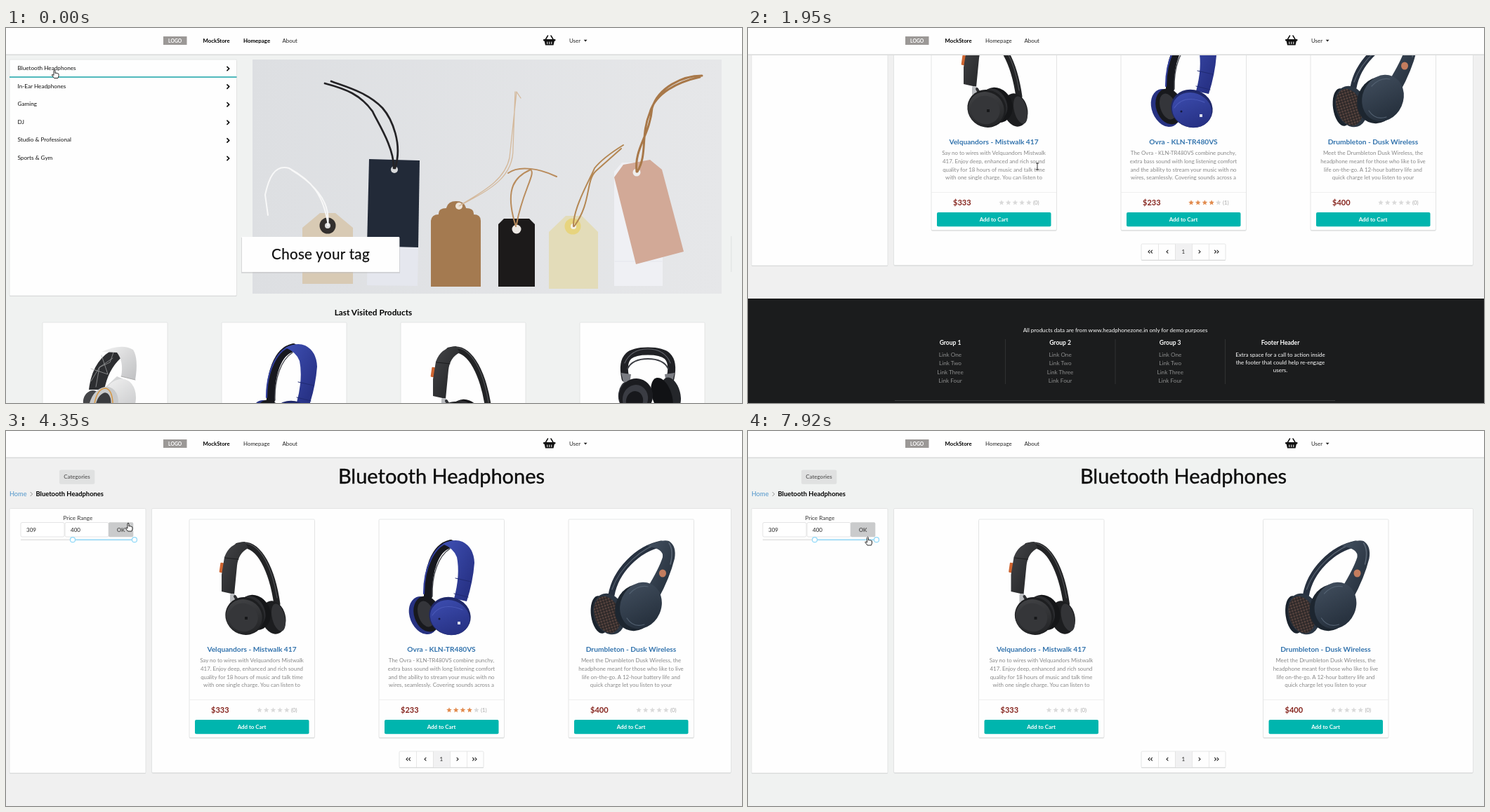
An HTML page that plays this animation: 1048x535 px, repeating every 8000 ms.

```html
<!DOCTYPE html>
<html lang="en">
<head>
<meta charset="utf-8">
<title>Shop price filter</title>
<style>
  html, body { margin: 0; width: 100%; height: 100%; overflow: hidden; background: #f0f2f1; }
  svg { display: block; width: 100vw; height: 100vh; font-family: Lato, sans-serif; }
</style>
</head>
<body>
<svg id="stage" viewBox="0 0 1048 535"></svg>
<script>
const MID = 'text-anchor="middle"', BOLD = 'font-weight="700"', MIDBOLD = MID + ' ' + BOLD;
const text = (x, y, size, str, attrs = '') => `<text x="${x}" y="${y}" font-size="${size}" ${attrs}>${str}</text>`;
const rect = (x, y, w, h, fill, attrs = '') => `<rect x="${x}" y="${y}" width="${w}" height="${h}" fill="${fill}" ${attrs}/>`;
const path = (d, fill, attrs = '') => `<path d="${d}" fill="${fill}" ${attrs}/>`;
const line = (d, color, width, attrs = '') => path(d, 'none', `stroke="${color}" stroke-width="${width}" stroke-linecap="round" ${attrs}`);
const oval = (x, y, rx, ry, fill, turn = 0, attrs = '') =>
  `<ellipse cx="${x}" cy="${y}" rx="${rx}" ry="${ry}" fill="${fill}" transform="rotate(${turn} ${x} ${y})" ${attrs}/>`;
const group = (body, attrs = '') => `<g ${attrs}>${body}</g>`;
const move = (body, x, y) => group(body, `transform="translate(${x} ${y})"`);
const chevron = (x, y, s, color, w, dir = 1) => line(`M${x - dir * s / 2} ${y - s}l${dir * s} ${s}l${-dir * s} ${s}`, color, w);
const panel = (x, y, w, h) => rect(x, y + 1, w, h, '#d4d6d6', 'rx="1.5"') +
  rect(x, y, w, h, '#fefefe', 'rx="1.5" stroke="#dfe0e0" stroke-width=".8"');
const blend = (id, a, b, dirs = 'x2="1" y2="1"') =>
  `<linearGradient id="${id}" x1="0" y1="0" ${dirs}><stop stop-color="${a}"/><stop offset="1" stop-color="${b}"/></linearGradient>`;

function star(x, y, color) {
  let d = '';
  for (let i = 0; i < 10; i++) {
    const a = i * Math.PI / 5, r = i % 2 ? 1.8 : 4;
    d += `${i ? 'L' : 'M'}${(x + r * Math.sin(a)).toFixed(2)} ${(y - r * Math.cos(a)).toFixed(2)}`;
  }
  return path(d + 'Z', color);
}

// Headphones, drawn where they stand in the list of three
const blackPair =
  line('M330 164C362 154 380 205 386 247', '#222325', 9) +
  line('M336 160C364 158 380 200 386 238', '#505154', 1.2) +
  rect(304.5, 188, 5, 14, '#cf6530', 'rx="1" transform="rotate(8 307 195)"') +
  path('M307 205L311 180Q318 160 340 158L345 167Q331 174 329 192L325 233L307 229Z', 'url(#coal)') +
  line('M312 181L331 183', '#1b1c1e', 1) +
  rect(319, 232, 7, 16, '#b9bbbe', 'rx="2"') + line('M326 236l6 10', '#303134', 4) +
  oval(381, 266, 17, 24, '#1c1d1f', -14) + oval(388, 266, 9, 20, '#333437', -14) +
  oval(354, 259, 22, 26, '#151618', -28) + oval(351, 257, 17, 23, '#2b2c2f', -28) +
  oval(340, 264, 28, 26.5, '#1d1e20', 30) + oval(339, 265, 26, 24.5, 'url(#coal)', 30) +
  oval(338, 266, 21, 20, '#353639', 30) + rect(340, 265, 4, 4, '#17181a');

const bluePair =
  line('M601 236C600 200 610 166 633 161', '#17181e', 12) +
  line('M595 232C595 195 610 160 635 158', '#323f9c', 2.2) +
  line('M607 236C606 205 616 178 632 168', '#44464d', 1.4) +
  path('M622 161Q638 153 650 158Q666 166 667 188Q665 215 656 243L638 239Q647 205 642 180Q638 168 622 161Z', 'url(#royal)') +
  line('M640 210l22 5M638 232l20 5', '#202a72', 1) +
  oval(595, 263, 20, 28, '#273282', -22) + oval(600, 261, 19, 26, '#18191d', -18) +
  oval(598, 261, 11, 19, '#34353a', -18) +
  oval(632, 264, 30, 27, '#1f2869', 20) + oval(632, 266, 28.5, 24.5, 'url(#royal)', 20) +
  line('M607 263Q620 243 650 255', '#4a59b8', 1.1) + rect(643, 272, 4, 4, '#d9dcea') +
  oval(617, 268, 1.5, 1.5, '#161a40');

const navyPair =
  line('M862 234C868 200 899 168 933 161', '#273140', 9) +
  line('M863 226C874 194 906 166 934 159', '#56616e', 1.3) +
  path('M913 164Q934 154 944 157Q955 164 952 182Q945 210 929 239L913 224Q930 196 935 180Q937 168 913 164Z', 'url(#slate)') +
  line('M944 160Q951 170 946 190', '#5c6876', 1.5) +
  oval(935, 203, 5, 5.5, '#c47d5e') +
  oval(846, 262, 13, 27, '#1b232d', -8) + oval(859, 261, 22, 30, '#2b3643', -18) +
  oval(856, 262, 18, 27, '#39302f', -18) + oval(856, 262, 18, 27, 'url(#mesh)', -18) +
  path('M915 240l16 7l-4 18l-8 3Z', '#1f2832') +
  oval(897, 252, 29, 34, '#1d2630', 24) + oval(904, 249, 29, 34, 'url(#slate)', 24) +
  line('M884 267Q893 281 909 276', '#526070', 1.2) + line('M888 232Q900 219 914 222', '#526070', 1.2);

const whitePair =
  path('M118 516Q123 472 156 457L168 467Q146 484 140 516Z', '#2d2e31') +
  line('M121 504l12-20l15-7l6-17M121 486l24 8l-9-27M128 512l5-28l19-13', '#a8a9ab', .7) +
  path('M136 462Q165 449 181 459Q189 472 184 502L164 497Q168 476 158 463Z', 'url(#pearl)') +
  line('M164 497l20 5', '#aaa', 1) + oval(123, 532, 13, 15, '#454649', 15) +
  path('M142 512l16-15l14 6l5 32h-40Z', '#d5d6d7') +
  oval(160, 533, 24, 33, 'url(#pearl)', 18) + oval(139, 538, 20, 27, '#c9cacb', 20) +
  line('M126 536Q130 514 142 514Q151 516 152 535', '#d79b4c', 1.7) +
  oval(138, 541, 11, 21, '#3a3b3e', 12);

const archPair =
  line('M882 500C875 467 890 461 914 461S953 467 946 500', '#202125', 11) +
  line('M881 478Q890 458 914 458T946 478', '#606269', 1.2) +
  line('M885 486Q892 472 914 472T943 486', '#3b3d43', 2) +
  path('M876 492l14 2l-2 13l-9-2ZM952 492l-14 2l2 13l9-2Z', '#7a7c82') +
  oval(881, 522, 9, 17, '#36383e', 8) + oval(947, 522, 13, 24, '#24262a', -15) +
  oval(934, 525, 14, 27, '#111215', -18) + oval(897, 525, 24, 25, '#1b1c20', 14) +
  oval(896, 529, 18, 20, '#3a3c43', 14) + oval(895, 532, 12, 14, '#17181c', 14);

const products = [
  { x: 350, name: 'Velquandors - Mistwalk 417', price: '$333', stars: 0, pair: blackPair, lines: [
    'Say no to wires with Velquandors Mistwalk', '417. Enjoy deep, enhanced and rich sound',
    'quality for 18 hours of music and talk time', 'with one single charge. You can listen to'] },
  { x: 620, name: 'Ovra - KLN-TR480VS', price: '$233', stars: 4, pair: bluePair, lines: [
    'The Ovra - KLN-TR480VS combine punchy,', 'extra bass sound with long listening comfort',
    'and the ability to stream your music with no', 'wires, seamlessly. Covering sounds across a'] },
  { x: 890, name: 'Drumbleton - Dusk Wireless', price: '$400', stars: 0, pair: navyPair, lines: [
    'Meet the Drumbleton Dusk Wireless, the', 'headphone meant for those who like to live',
    'life on-the-go. A 12-hour battery life and', 'quick charge let you listen to your'] }
];

function card({ x, name, price, stars, pair, lines }) {
  const left = x - 89;
  let s = panel(left, 126, 178.5, 311.5) + pair +
    text(x, 314.5, 10.2, name, `${MIDBOLD} fill="#3273ad"`) +
    lines.map((l, i) => text(x, 330 + i * 11.8, 7.9, l, `${MID} fill="#888"`)).join('') +
    rect(left, 383, 178, .8, '#ebebeb') +
    text(x - 58, 402, 11, price, `${BOLD} fill="#85231c"`);
  for (let i = 0; i < 5; i++) s += star(left + 100 + i * 9.7, 398.2, i < stars ? '#e18a4d' : '#dadada');
  return s + text(x + 56, 401, 7.8, stars ? '(1)' : '(0)', 'fill="#aaa"') +
    rect(x - 81, 412, 162.5, 20.3, '#00b5ae', 'rx="2"') +
    text(x, 425, 7.9, 'Add to Cart', `${MIDBOLD} fill="#fff"`);
}

function header() {
  const name = (id, attrs) => text(338, 20.7, 7.9, 'Homepage', `id="${id}" ${attrs}`);
  return rect(0, 37, 1048, 2, '#dcdddd') + rect(0, 0, 1048, 37.3, '#fefefe') +
    rect(224, 12, 33.5, 12, '#9b9896') + text(240.7, 20.5, 6.8, 'LOGO', `${MIDBOLD} fill="#fff"`) +
    text(280.5, 20.7, 7.8, 'MockStore', BOLD) + name('navBold', BOLD) + name('navPlain', 'fill="#222"') +
    text(393.5, 20.7, 7.9, 'About', 'fill="#222"') +
    rect(765, 16, 17.5, 2.4, '#111', 'rx="1"') + path('M766.5 18h14.5l-1.5 6.5h-11.5Z', '#111') +
    line('M768.5 16l3-5M779 16l-3-5', '#111', 1.5) +
    line('M770.8 20v2.6M773.8 20v2.6M776.8 20v2.6', '#fff', 1) +
    text(802, 20.7, 7.9, 'User', 'fill="#222"') + path('M822.7 16.8h4.8l-2.4 2.6Z', '#222');
}

function hero() {
  const twine = (d, color, w = 2) => line(d, color, w, 'stroke-linejoin="round"');
  return rect(351, 45, 668, 334, 'url(#wall)') +
    path('M422 285L447 264H469L494 285V365H422Z', '#d8cab4') + oval(458, 282, 11.5, 11.5, '#332f2d') + oval(458, 282, 4, 4, '#ddd') +
    twine('M459 282C452 238 436 218 403 200C382 194 374 215 369 238L373 267M458 282C464 243 430 217 407 203', '#f8f8f8', 2) +
    path('M517 187L589 189L586 368L514 367Z', '#e5e7ee') + path('M517 187L589 189L587 313L514 311Z', '#222a38') +
    oval(553, 202, 5, 5, '#d8d9db') +
    twine('M552 200C553 170 528 133 522 119C505 95 484 87 454 79M554 200C565 166 550 130 536 114C514 91 481 83 463 76', '#242326', 2.7) +
    path('M605 369V275Q606 266 616 266Q615 257 627 257Q629 247 641 247Q653 247 655 257Q667 257 666 266Q676 266 676 275V369Z', '#a47a50') +
    oval(645, 254, 5, 5, '#eee5da') +
    twine('M645 254C671 237 710 220 717 185L727 91M645 254C688 231 723 214 722 171L725 91M727 91l6 9', '#d4b99c', 1.3) +
    path('M701 280L709 272H745L753 280V369H701Z', '#1c1a1a') + oval(727, 287, 6.5, 6.5, '#ece8e4') +
    twine('M726 283C708 226 727 211 747 202C755 207 735 234 727 280M715 207C731 195 761 201 784 212', '#b98c5d', 2) +
    path('M773 291L797 268H820L843 291V372H773Z', '#e3dcb9') + oval(807, 283, 11.5, 11.5, '#e7d47e') + oval(808, 283, 4, 4, '#f4f1e6') +
    twine('M808 283C807 257 833 213 838 200Q850 185 879 167M809 283C834 249 825 218 840 204L876 172', '#b48753', 2) +
    path('M866 205L877 192H922L935 205V368H866Z', '#eff0f4') + line('M867 333H934', '#dcdee4', .6) +
    path('M866 213L879 195L917 188L934 202L965 319L897 337Z', '#d2a997') + oval(898, 206, 5.5, 5.5, '#eee') +
    twine('M898 205C894 172 917 153 920 114C929 85 963 68 991 68M899 205C914 179 903 154 917 120C925 93 956 77 988 70', '#a87849', 3) +
    rect(335, 299, 226, 51, '#bfc0c2', 'opacity=".5"') + rect(336, 298, 224, 50, '#fefefe') +
    text(448, 330, 20.6, 'Chose your tag', `${MID} letter-spacing=".3" fill="#111" stroke="#111" stroke-width=".25"`);
}

function home() {
  const names = ['Bluetooth Headphones', 'In-Ear Headphones', 'Gaming', 'DJ', 'Studio &amp; Professional', 'Sports &amp; Gym'];
  const thumbs = [[52, whitePair], [307, move(bluePair, -224, 295)], [562, move(blackPair, 301, 296)], [817, archPair]];
  return panel(5, 45, 323.5, 337) + rect(5, 69.2, 323.5, 1.6, '#27a9ac') +
    names.map((n, i) => text(16.5, 60 + i * 25.6, 8.2, n, 'fill="#111"') + chevron(316.3, 58 + i * 25.6, 2.7, '#111', 1.7)).join('') +
    hero() + rect(1032, 297, 1.3, 51, '#e2e5e4') +
    text(523, 409.7, 11.8, 'Last Visited Products', MIDBOLD) +
    thumbs.map(([x, pair]) => panel(x, 420, 178, 140) + pair).join('');
}

function footer() {
  const links = ['Link One', 'Link Two', 'Link Three', 'Link Four'];
  let s = rect(0, 535, 1048, 200, '#1b1c1d') +
    text(523, 582.5, 8, 'All products data are from www.headphonezone.in only for demo purposes', `${MID} fill="#fff"`);
  for (let i = 0; i < 3; i++) {
    const x = 288 + i * 156.6;
    s += text(x, 600.5, 8.5, 'Group ' + (i + 1), `${MIDBOLD} fill="#fff"`) +
      links.map((l, j) => text(x, 618 + j * 12.3, 8.2, l, `${MID} fill="#8d8e8e"`)).join('') +
      rect(x + 78, 593, .8, 64, '#363738');
  }
  const call = ['Extra space for a call to action inside', 'the footer that could help re-engage', 'users.'];
  return s + text(758, 600.5, 8.5, 'Footer Header', `${MIDBOLD} fill="#fff"`) +
    call.map((l, j) => text(758, 618.3 + j * 10.8, 8, l, `${MID} fill="#fff"`)).join('') +
    rect(209, 680, 627, .9, '#404142');
}

function listing() {
  const pager = panel(560, 457, 120, 23) + rect(608, 457.4, 24, 22.3, '#f1f1f2') +
    [584, 608, 632, 656].map(x => rect(x, 457, .7, 23, '#dedede')).join('') +
    text(619.8, 471.2, 8, '1', `${MID} fill="#222"`) +
    [[571, -1], [574.5, -1], [597, -1], [643, 1], [665.5, 1], [669, 1]].map(([x, d]) => chevron(x, 468.2, 2, '#222', 1.1, d)).join('');
  const field = (x, id, value) => rect(x, 130.5, 62, 20.5, '#fff', 'rx="2" stroke="#dededf" stroke-width=".8"') +
    text(x + 8, 144, 8, value, `id="${id}" fill="#222"`);
  const knob = id => `<circle id="${id}" cx="183" cy="155.2" r="3.5" fill="#fff" stroke="#8fd8f8" stroke-width="1.2"/>`;
  return rect(76, 55.5, 50.3, 20.2, '#e0e1e1', 'rx="2"') + text(101, 68.3, 7.9, 'Categories', `${MIDBOLD} fill="#686868"`) +
    text(5, 93, 9.2, 'Home', 'fill="#4e94ca"') + chevron(36.3, 90, 2.7, '#888', .9) +
    text(42.5, 93, 9.4, 'Bluetooth Headphones', BOLD) +
    text(620, 75, 29, 'Bluetooth Headphones', `${MID} fill="#0d0d0d" stroke="#0d0d0d" stroke-width=".35"`) +
    panel(5, 110.5, 194, 377.5) + panel(207.5, 110.5, 825, 377) +
    text(102.3, 127, 8.1, 'Price Range', `${MID} fill="#333"`) +
    field(21, 'low', '233') + field(84, 'high', '400') +
    rect(146, 130.2, 35.3, 21, '#e0e1e1', 'id="ok" rx="2"') + text(163.6, 143.7, 7.9, 'OK', `${MIDBOLD} fill="#555"`) +
    rect(21, 154.2, 162, 2, '#e7e7e7') + rect(21, 154.2, 162, 2, '#a9e0f9', 'id="track"') + knob('knob') + knob('knobEnd') +
    products.map((p, i) => group(card(p), `id="card${i}"`)).join('') + pager + footer();
}

// Pointer shapes with their hot spot at 0,0
const fist = 'M-4 -1Q-4 -4 -2.5 -3.5Q-2 -5.5 -.5 -4.5Q1 -5.7 2 -4Q4 -4.5 4 -2V1Q3 3 2.5 5H-2Q-3 3 -5 1Q-6 -1 -4 -1Z';
const inked = 'stroke="#111" stroke-width=".9" stroke-linejoin="round"';
const shapes = {
  arrow: path('M0 0V9.4L2.2 7.4L3.7 10.8L5.2 10.1L3.7 6.8H6.6Z', '#fff', inked),
  hand: path('M-1 1Q0 -.8 1 1V5Q2 4 3 5Q4 4.3 4.8 5.6Q6 5 6 7V9L5 12H-.5L-3.8 7.6Q-3.6 6 -1 8Z', '#fff', inked),
  beam: line('M-1.6 -4.5H1.6M0 -4.5V4.5M-1.6 4.5H1.6', '#222', .9),
  grab: path('M-2.8 0L-3.6 -3Q-2.8 -4.5 -2 -2.8L-1.5 -4.7Q-.4 -5.7 .2 -4.6L1 -5Q2 -5 2.1 -3.6Q4.2 -4.6 4.1 -2V1L2.5 5H-2L-5 .8Q-4.7 -1.3 -2.8 0Z', '#fff', inked) +
    line('M-1.4 -2.5v1.8M.3 -3v2.2M2 -2.8v2', '#111', .6),
  fist: path(fist, '#fff', inked) + line('M-1.7 -3v1.6M.2 -3.4v1.8M2 -3v1.5', '#111', .6)
};

// time, x, y, shape from then on
const route = [
  [0, 69, 59.5, 'hand'], [230, 69, 59.5, 'arrow'], [700, 217.5, 118, 'arrow'], [1030, 337, 126, 'arrow'],
  [1180, 380, 175, 'beam'], [1310, 400, 202, 'beam'], [1490, 400, 202, 'beam'], [1750, 412, 197.5, 'beam'],
  [2050, 412, 197.5, 'arrow'], [2280, 256, 192, 'arrow'], [2980, 17, 152, 'grab'], [3100, 20, 155, 'fist'],
  [3200, 20, 155, 'fist'], [3990, 82, 160, 'fist'], [4140, 95, 158, 'arrow'], [4260, 150, 140, 'hand'],
  [4350, 174, 131, 'hand'], [5550, 173, 132, 'arrow'], [5700, 147, 158, 'arrow'], [5880, 156.5, 158.5, 'arrow'],
  [6150, 185, 162, 'arrow'], [6340, 180, 152, 'arrow'], [6700, 110, 151, 'arrow'], [7090, 185, 149, 'arrow'],
  [7230, 185, 149, 'arrow'], [7310, 184, 149, 'arrow'], [7540, 184, 149, 'hand'], [7920, 170.5, 151, 'hand'], [8000, 170.5, 151, 'hand']
];

const specks = '<pattern id="mesh" width="4" height="4" patternUnits="userSpaceOnUse"><circle cx="1" cy="1" r=".75" fill="#8d6658"/><circle cx="3" cy="3" r=".75" fill="#15171a"/></pattern>';
const stage = document.getElementById('stage');
stage.innerHTML = '<defs>' + blend('coal', '#454649', '#1e1f21') + blend('royal', '#3f50b4', '#222b7b') +
  blend('slate', '#445161', '#202a36') + blend('pearl', '#f2f2f2', '#bfc0c2') + blend('wall', '#dddfe2', '#e6e7e9', 'x2="1" y2="0"') + specks + '</defs>' +
  rect(0, 0, 1048, 535, '#f0f2f1', 'id="back"') + group(home(), 'id="home"') + group(listing(), 'id="listing"') +
  path('M0 531H346Q349 531 349 534V535H0Z', '#a0a0a0', 'id="status"') + header() +
  group(Object.entries(shapes).map(([k, s]) => group(s, `id="${k}"`)).join(''), 'id="pointer"');

const at = id => document.getElementById(id);
const show = (id, on) => at(id).setAttribute('display', on ? 'inline' : 'none');
const put = (id, x, y) => at(id).setAttribute('transform', `translate(${x} ${y})`);
const ease = (t, a, b) => { const p = Math.min(1, Math.max(0, (t - a) / (b - a))); return p * p * (3 - 2 * p); };

function draw(t) {
  let i = 0;
  while (i < route.length - 2 && t >= route[i + 1][0]) i++;
  const [t0, x0, y0, shape] = route[i], [t1, x1, y1] = route[i + 1];
  const p = ease(t, t0, t1), x = x0 + (x1 - x0) * p;
  put('pointer', x, y0 + (y1 - y0) * p);
  for (const k in shapes) show(k, k === shape);

  const atHome = t < 230, filtered = t >= 4860;
  show('home', atHome); show('listing', !atHome);
  show('navBold', atHome); show('navPlain', !atHome);
  show('status', !atHome && t < 1030);
  at('back').setAttribute('fill', atHome || filtered ? '#f0f2f1' : '#f0f0f0');

  put('listing', 0, -149 * (ease(t, 1490, 1750) - ease(t, 1990, 2260)));
  show('card1', !filtered);
  put('card0', filtered ? 67.5 : 0, 0);
  put('card2', filtered ? -67.5 : 0, 0);

  const knob = t < 3200 ? 21 : t < 4140 ? Math.max(21, x) : 95;
  at('knob').setAttribute('cx', knob);
  at('track').setAttribute('x', knob);
  at('track').setAttribute('width', 183 - knob);
  at('low').textContent = Math.round(233 + 167 * (knob - 21) / 162);
  at('ok').setAttribute('fill', shape === 'hand' && !atHome ? '#cacbcc' : '#e0e1e1');
}

function tick() {
  draw(performance.now() % 8000);
  requestAnimationFrame(tick);
}
tick();
</script>
</body>
</html>
```
